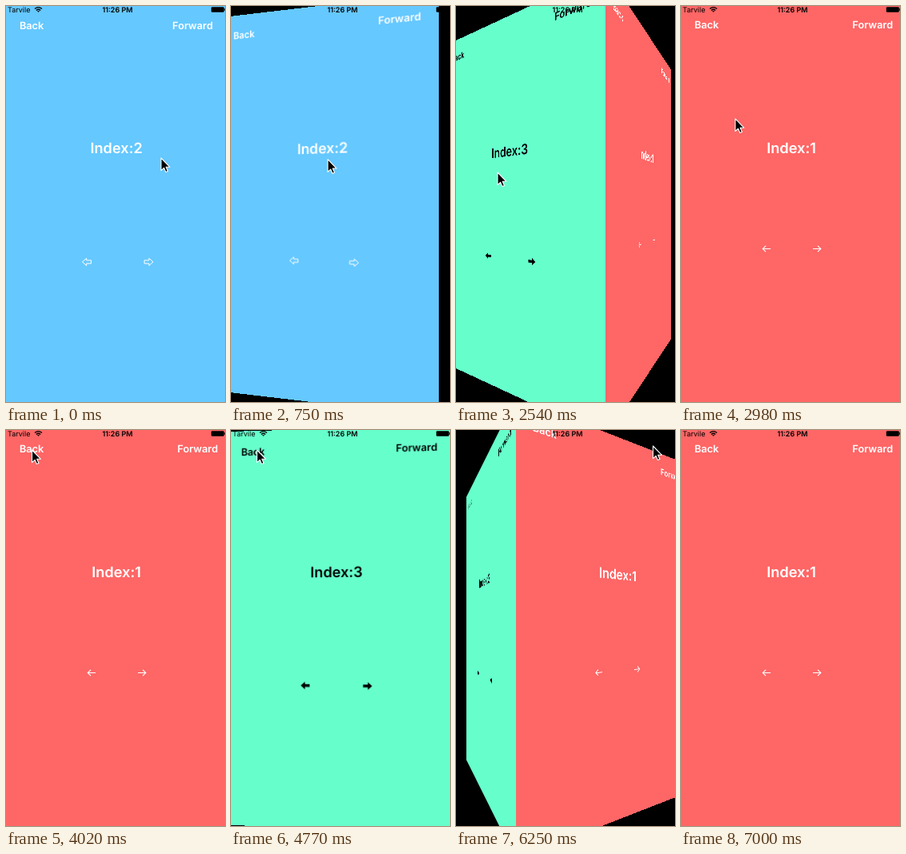
Recreate the animation shown at these times as an HTML page. Size 274x495 px, loop 8200 ms.

```html
<!DOCTYPE html>
<html lang="en">
<head>
<meta charset="utf-8">
<title>Cube pages</title>
<style>
  html, body { margin: 0; width: 100%; height: 100%; overflow: hidden; background: #000; }
  #stage { position: relative; width: 274px; height: 495px; overflow: hidden; background: #000; }
  .page {
    position: absolute; left: -2.1px; top: -2.5px; width: 281px; height: 500px;
    backface-visibility: hidden; will-change: transform;
  }
  svg { position: absolute; left: 0; top: 0; display: block; }
  text { font-family: Inter, Roboto, sans-serif; font-weight: 600; text-rendering: geometricPrecision; }
  .nav { font-size: 12.75px; }
  .title { font-size: 18.2px; text-anchor: middle; }
  .status { font-size: 9px; }
</style>
</head>
<body>
<div id="stage">
  <svg id="overlay" width="274" height="495" style="z-index:2">
    <text class="status" x="2" y="7.8" style="font-weight:400">Tarvile</text>
    <g fill="none" stroke="#000" stroke-width="1.3">
      <path d="M36 3.6Q40.5 -0.4 45 3.6"/>
      <path d="M37.8 5.4Q40.5 3 43.2 5.4"/>
      <path d="M39.4 6.4H41.6L40.5 7.5Z" fill="#000" stroke-width=".6"/>
    </g>
    <text class="status" x="139.5" y="7.8" text-anchor="middle">11:26 PM</text>
    <rect x="256.8" y="1.2" width="16" height="6.6" rx="1.2"/>
    <rect x="273.2" y="3.2" width="1" height="2.6"/>
    <path id="cursor" d="M0 0V15.6L3.6 12.3L5.9 17.6L8.5 16.5L6.2 11.3H11Z"
      fill="#000" stroke="#fff" stroke-width="1.1" stroke-linejoin="round"/>
  </svg>
</div>
<script>
const LOOP = 8200, TICK = 148.9, POINTER_GONE = 6990;
const HALF = 140.5, DEPTH = 375;

// Right-pointing arrows centred on the origin
const OUTLINE = '<path d="M-5.5 -2H0.3V-4.6L5.5 0L0.3 4.6V2H-5.5Z" fill="none" stroke="currentColor"/>';
const SOLID = '<path d="M-5.5 -1.7H0.4V-4.7L5.8 0L0.4 4.7V1.7H-5.5Z" fill="currentColor"/>';
const THIN = '<path d="M-5 0H4.6M1 -3.7L4.8 0L1 3.7" fill="none" stroke="currentColor" stroke-width="1.1"/>';

const PAGES = [
  { index: 2, bg: '#65c8ff', ink: '#fff', navY: 28.7, forwardX: 208,
    arrow: OUTLINE, middle: 139.7, spread: 38.8, arrowY: 319.4 },
  { index: 3, bg: '#66ffcc', ink: '#000', navY: 28.4, forwardX: 212,
    arrow: SOLID, middle: 137.8, spread: 39, arrowY: 319.2 },
  { index: 1, bg: '#ff6666', ink: '#fff', navY: 27.6, forwardX: 214.3,
    arrow: THIN, middle: 138.5, spread: 31.5, arrowY: 303 }
];

const move = (start, length, ...to) => ({ start, length, to });

// Two swipes, then a tap on Back and a tap on Forward
const TURNS = [
  move(450, 1367, 1), move(2240, 705, 2), move(4497, 300, 1), move(6069, 300, 2)
];

// Swipe, return, swipe, up and over to Back, across to Forward, away
const POINTER = [
  move(300, 1040, 5.5, 194.5), move(1490, 750, 155, 207), move(2240, 290, 52, 208),
  move(2680, 745, 98, 14), move(3425, 595, 32.5, 25),
  move(4900, 760, 246.5, 20), move(6600, 250, 129, 366)
];

function ease(k) {
  return (1 - Math.cos(Math.PI * Math.min(1, Math.max(0, k)))) / 2;
}

function follow(from, moves, time) {
  return moves.reduce((at, { start, length, to }) => {
    const p = ease((time - start) / length);
    return at.map((v, i) => v + (to[i] - v) * p);
  }, from);
}

const stage = document.getElementById('stage');
const cursor = document.getElementById('cursor');

const faces = PAGES.map(p => {
  const face = document.createElement('div');
  face.className = 'page';
  face.style.background = p.bg;
  face.style.color = p.ink;
  const arrow = side => `<g transform="translate(${p.middle + side * p.spread} ${p.arrowY})
    scale(${side} 1)">${p.arrow}</g>`;
  face.innerHTML = `<svg width="281" height="500" viewBox="-2.1 -2.5 281 500" fill="currentColor">
    <text class="nav" x="16.8" y="${p.navY}">Back</text>
    <text class="nav" x="${p.forwardX}" y="${p.navY}">Forward</text>
    <text class="title" x="138" y="183.6">Index:${p.index}</text>
    ${arrow(-1)}${arrow(1)}
  </svg>`;
  stage.prepend(face);
  return face;
});

function draw(elapsed) {
  // The picture advances in even steps
  const time = Math.floor((elapsed % LOOP + 6) / TICK) * TICK;
  const [turn] = follow([0], TURNS, time);
  faces.forEach((face, i) => {
    const angle = (i - turn) * 90;
    face.style.visibility = Math.abs(angle) < 90 ? 'visible' : 'hidden';
    face.style.transform = angle === 0 ? 'none' :
      `perspective(${DEPTH}px) translateZ(${-HALF}px) rotateY(${angle}deg) translateZ(${HALF}px)`;
  });
  const [x, y] = follow([194, 190], POINTER, time);
  cursor.setAttribute('transform', `translate(${x} ${y})`);
  cursor.style.visibility = time < POINTER_GONE ? 'visible' : 'hidden';
}

const start = performance.now();
function loop() {
  draw(performance.now() - start);
  requestAnimationFrame(loop);
}
loop();
</script>
</body>
</html>
```
